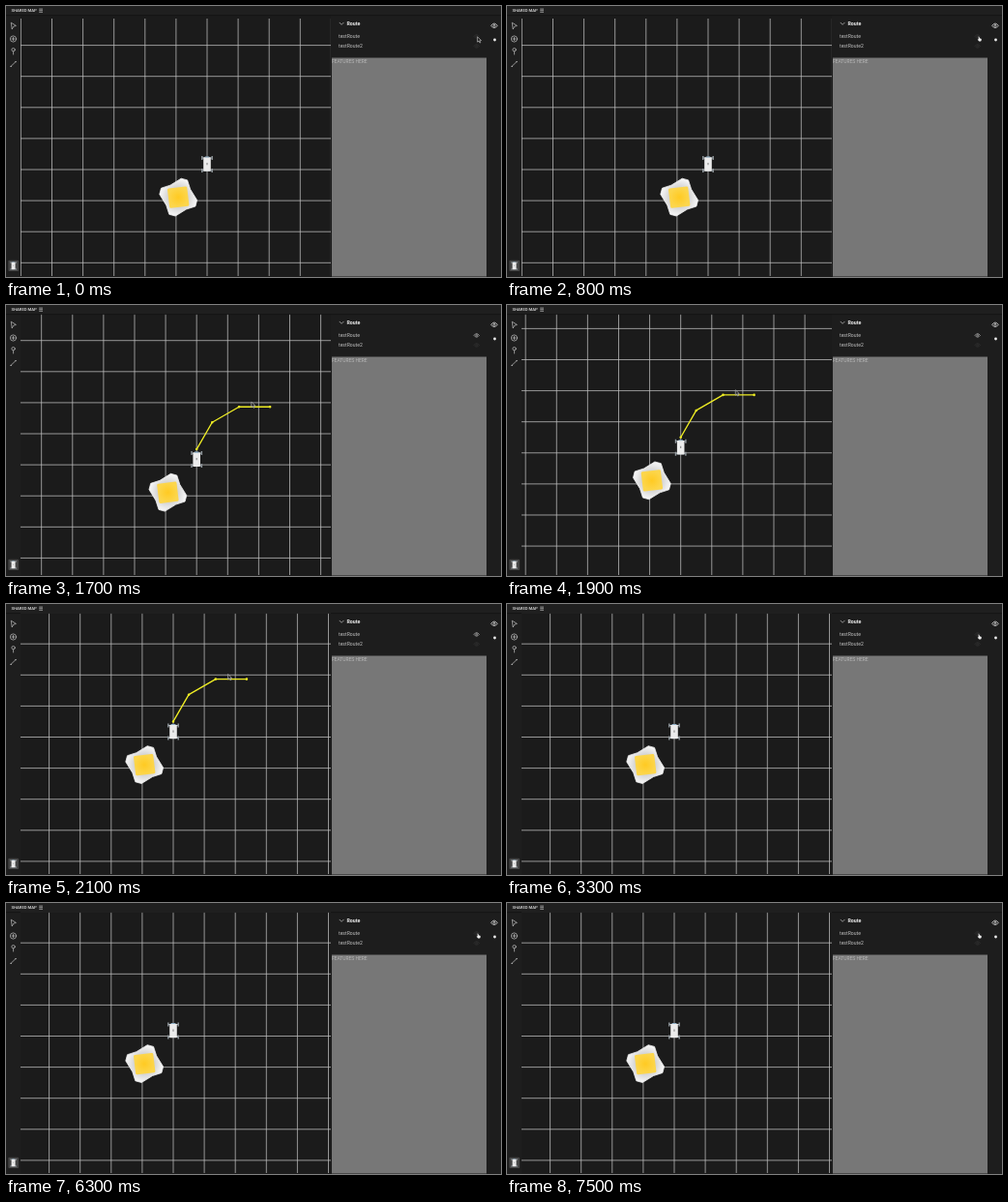
Recreate the animation shown at these times as an HTML page. Size 512 by 280 pixels, loop 7700 ms.

```html
<!DOCTYPE html>
<html lang="en">
<head>
<meta charset="utf-8">
<title>Shared map</title>
<style>
  html, body { margin: 0; width: 100%; height: 100%; overflow: hidden; background: #1c1c1c; }
  svg { display: block; width: 512px; height: 280px; }
  text { font-family: Roboto, "Open Sans", sans-serif; fill: #c0c0c0; }
  .icon { fill: none; stroke: #b8b8b8; stroke-width: .75; stroke-linecap: round; stroke-linejoin: round; }
  .grid { fill: none; stroke: #c0c0c0; stroke-width: .75; }
  .route { fill: none; stroke: #eeec24; stroke-width: 1.35; stroke-linejoin: round; }
  .toggle { color: #323232; }
  .toggle.on { color: #b0b0b0; }
</style>
</head>
<body>
<svg viewBox="0 0 512 280">
  <defs>
    <clipPath id="view"><rect x="15" y="9.3" width="321" height="269.7"/></clipPath>
    <radialGradient id="yolk">
      <stop offset="0" stop-color="#ffca22"/>
      <stop offset="1" stop-color="#fcd64c"/>
    </radialGradient>
    <radialGradient id="white" gradientUnits="userSpaceOnUse" cx="0" cy="0" r="20">
      <stop offset=".5" stop-color="#d2d2d2"/>
      <stop offset=".95" stop-color="#f6f6f6"/>
    </radialGradient>
    <g id="eye" fill="none" stroke="currentColor" stroke-width=".75">
      <path d="M-2.7 0Q0-3.6 2.7 0Q0 3.6-2.7 0Z"/>
      <circle r=".8"/>
    </g>
    <g id="car">
      <path d="M-5-6H5M-5 7H5" stroke="#a4b1ba" stroke-width="1"/>
      <path d="M-5.2-8v4M5.2-8v4M-5.2 5v4M5.2 5v4" stroke="#92999e" stroke-width="1.4"/>
      <rect x="-3.8" y="-6.8" width="7.6" height="14.6" rx=".8" fill="#ececec"/>
      <path d="M-2.2-7H2.2" stroke="#8fb0c8" stroke-width="1.1"/>
      <path d="M0-1v2.2" stroke="#888" stroke-width="1.1"/>
    </g>
  </defs>

  <rect width="512" height="280" fill="#1c1c1c"/>

  <g clip-path="url(#view)">
    <rect x="15" y="9" width="321" height="271" fill="#1b1b1b"/>
    <g id="map">
      <path id="grid" class="grid"/>
      <g transform="translate(-29.8 28.6)">
        <path id="egg" fill="url(#white)" stroke="#f0f0f0" stroke-width=".8" stroke-linejoin="round"/>
        <rect x="-10.2" y="-10.2" width="20.4" height="20.4" rx="1.5" fill="url(#yolk)" transform="rotate(-7)"/>
      </g>
      <use href="#car" y="-6"/>
      <g id="route1" class="route"></g>
      <g id="route2" class="route"></g>
    </g>
  </g>

  <rect width="512" height="9.3" fill="#1f1f1f"/>
  <rect y="9.3" width="15" height="271" fill="#1e1e1e"/>
  <text x="5.6" y="6.3" font-size="4.3" font-weight="500" letter-spacing="-.1" style="fill:#d6d6d6">SHARED MAP</text>
  <path class="icon" d="M34.6 3.1h3M34.6 4.7h3M34.6 6.3h3"/>

  <g class="icon">
    <path d="M5.6 17.4L10.4 20.4L7.8 21.2L6.4 23.7Z"/>
    <circle cx="7.5" cy="34" r="3.1"/>
    <path d="M6 34h3M7.5 32.5v3"/>
    <circle cx="7.6" cy="45.2" r="1.7"/>
    <path d="M7.6 47v3M5.4 62L9.8 57.8"/>
    <path d="M5 62.4h.2M10 57.6h.2" stroke-width="1.3"/>
  </g>
  <rect x="2.3" y="262.7" width="10.8" height="11.2" rx="1" fill="#444"/>
  <use href="#car" transform="translate(7.6 268.2) scale(.52)"/>

  <rect x="336" y="9.3" width="176" height="271" fill="#1d1d1d"/>
  <path d="M0 9.6H512" stroke="#131313" stroke-width=".8"/>
  <path class="icon" d="M345 17.2L347.1 19.3L349.2 17.2"/>
  <text x="352.4" y="20.2" font-size="5.3" font-weight="700" style="fill:#ededed">Route</text>
  <text x="344" y="33.2" font-size="5.1">testRoute</text>
  <text x="344" y="43" font-size="5.1">testRoute2</text>
  <use href="#eye" transform="translate(505 20.3) scale(1.25)" color="#c0c0c0"/>
  <circle cx="505.5" cy="35" r="1.4" fill="#ededed"/>
  <use id="eye1" class="toggle" href="#eye" x="486.7" y="31.4"/>
  <use id="eye2" class="toggle" href="#eye" x="486.7" y="41.4"/>
  <rect x="337" y="53.5" width="160" height="226" fill="#777"/>
  <text x="336.9" y="58.8" font-size="4.95" style="fill:#b8b8b8">FEATURES HERE</text>

  <g id="cursor">
    <path id="arrow" d="M0 0V5.4L1.4 4.3L2.4 6.3L3.2 5.9L2.3 4L4 3.8Z" fill="#222" stroke="#d0d0d0" stroke-width=".6"/>
    <path id="hand" d="M0-.2Q.6-.8 .9 .2L1.2 1.5L2.8 2Q3.4 2.3 3.1 3.6L2.5 4.8H.7L-.9 3Q-.8 2.2 .2 2.7Z" fill="#efefef"/>
  </g>
</svg>
<script>
const LOOP = 7700, STEP = 100, CELL = 32.1;
const HOME = [208, 169], GRAB = [264.6, 104];
const EYE1 = [487.6, 31.8], EYE2 = [486.8, 40.6];
const $ = id => document.getElementById(id);

const ramp = (t, a, b) => Math.min(1, Math.max(0, (t - a) / (b - a)));
const smooth = u => u * u * (3 - 2 * u);
const overshoot = u => 1 + 2.2 * (u - 1) ** 3 + 1.2 * (u - 1) ** 2;
const mix = (p, q, f) => p.map((v, i) => v + (q[i] - v) * f);
const add = (p, q) => p.map((v, i) => v + q[i]);
const within = (t, a, b) => t >= a && t < b;

function panAt(t) {
  const u = ramp(t, 1600, 2100);
  return [-35 * Math.sin(u * Math.PI / 2), -31.5 * u ** 1.3];
}

// Leave the first eye, drag the map, return, then visit the second eye
function cursorAt(t) {
  if (t < 1600) return mix(EYE1, GRAB, smooth(ramp(t, 1200, 1600)));
  const held = add(GRAB, panAt(t));
  if (t < 2900) return mix(held, EYE1, overshoot(ramp(t, 2100, 2900)));
  return mix(EYE1, EYE2, ramp(t, 3500, 3700) - ramp(t, 5100, 5400));
}

function drawGrid() {
  let d = "";
  for (let k = -6; k <= 6; k++) d += `M${k * CELL}-156V160`;
  for (let k = -4; k <= 4; k++) d += `M-194 ${k * CELL}H200`;
  $("grid").setAttribute("d", d);
}

function drawEgg() {
  let lobe = [[3, -19.4], [9.4, -17.7], [12.4, -8.3]];
  const points = [];
  for (let i = 0; i < 4; i++) {
    points.push(...lobe);
    lobe = lobe.map(([x, y]) => [-y, x]);
  }
  $("egg").setAttribute("d", "M" + points.join("L") + "Z");
}

// Each leg is one cell long; headings are degrees clockwise from up
function drawRoute(id, headings) {
  const points = [[0, -CELL / 2]];
  headings.forEach((deg, i) => {
    const a = deg * Math.PI / 180;
    points.push(add(points[i], [CELL * Math.sin(a), -CELL * Math.cos(a)]));
  });
  const dots = points.map(([x, y]) => `<circle cx="${x}" cy="${y}" r=".6"/>`);
  $(id).innerHTML = `<path d="M${points.join("L")}"/>` + dots.join("");
}

function place(id, [x, y]) {
  $(id).setAttribute("transform", `translate(${x} ${y})`);
}

function show(id, on) {
  $(id).style.display = on ? "" : "none";
}

function setRoute(n, on) {
  show("route" + n, on);
  $("eye" + n).classList.toggle("on", on);
}

function render(now) {
  const t = Math.floor((now % LOOP) / STEP) * STEP;
  const pointing = within(t, 500, 1300) || t >= 2900;
  place("map", add(HOME, panAt(t)));
  place("cursor", cursorAt(t));
  show("arrow", !pointing);
  show("hand", pointing);
  setRoute(1, within(t, 1000, 3300) || within(t, 5600, 6300));
  setRoute(2, within(t, 3900, 5100));
}

drawGrid();
drawEgg();
drawRoute("route1", [30, 60, 90]);
drawRoute("route2", [-30, 0, 30]);

const start = performance.now();
function tick() {
  render(performance.now() - start);
  requestAnimationFrame(tick);
}
tick();
</script>
</body>
</html>
```
